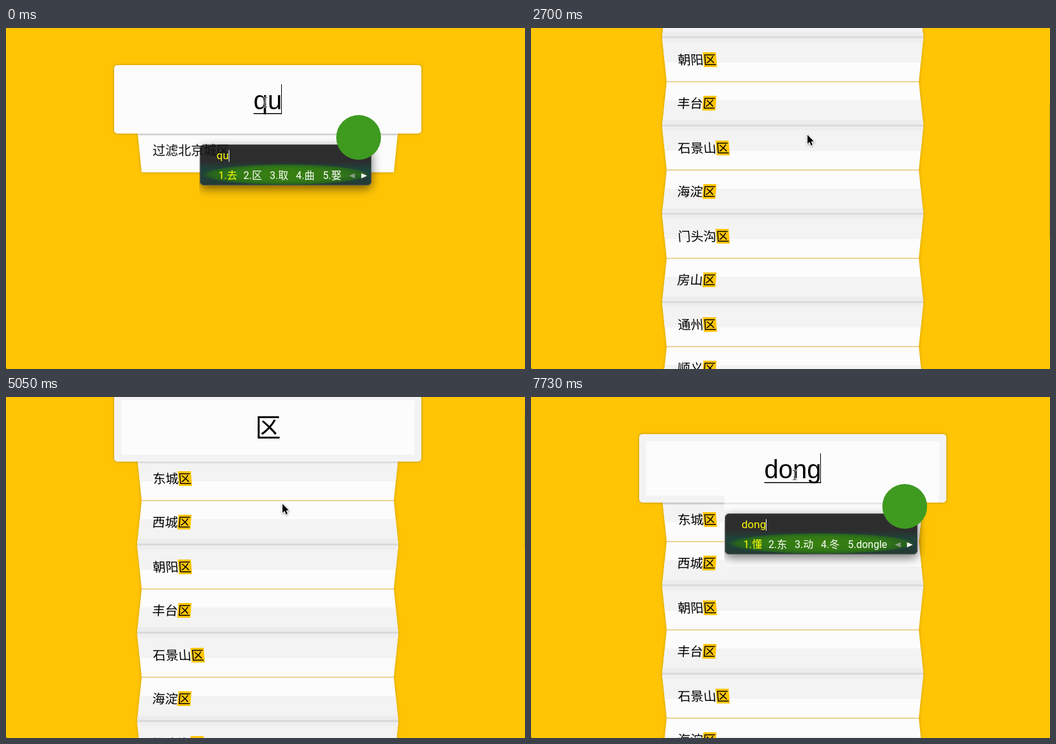
An HTML page with a canvas for the animation above (8000 ms loop, 811 by 533 pixels).

```html
<!DOCTYPE html>
<html lang="zh-CN">
<head>
<meta charset="utf-8">
<style>
html, body { margin: 0; width: 100%; height: 100%; overflow: hidden; background: #ffc505; }
canvas { display: block; }
</style>
</head>
<body>
<canvas id="stage" width="811" height="533"></canvas>
<script>
const c = document.getElementById('stage').getContext('2d');
const CJK = '"Noto Sans CJK SC", "Noto Sans CJK", sans-serif';
const YELLOW = '#ffc505', WHITE = '#fcfcfc', GRAY = '#f3f3f3';
const TOP = 157, PITCH = 69, STEP = 147.7, SCROLL_START = 1650;
const districts = '东城 西城 朝阳 丰台 石景山 海淀 门头沟 房山 通州 顺义 昌平 大兴 怀柔 平谷 密云 延庆'.split(' ');

// Key points as [step, value...]
const scrollKeys = [[0, 0], [1, 12], [3, 65], [6, 225], [7, 280], [9, 450], [12, 740], [14, 781],
  [15, 768], [18, 420], [21, 125], [23, 64], [26, 0]];
const mouseKeys = [[-1, 405, 116], [2, 432, 167], [25, 432, 167], [29, 412, 122]];

const typing = [
  { from: 0, to: 150, word: 'qu', list: ['去', '区', '取', '曲', '娶'] },
  { from: 7430, to: 7580, word: 'd', list: ['的', '大', '到', '都', '对'] },
  { from: 7580, to: 7730, word: 'do', list: ['都', '动', '东', '懂', 'double'] },
  { from: 7730, to: 8000, word: 'dong', list: ['懂', '东', '动', '冬', 'dongle'] }
];

function at(keys, k, col = 1) {
  const i = keys.findIndex(p => p[0] > k);
  if (i === 0) return keys[0][col];
  if (i < 0) return keys[keys.length - 1][col];
  const a = keys[i - 1], b = keys[i];
  return a[col] + (b[col] - a[col]) * (k - a[0]) / (b[0] - a[0]);
}

function rect(color, x, y, w, h) {
  c.fillStyle = color;
  c.fillRect(x, y, w, h);
}

function text(str, x, y, font, color = '#000', align = 'left') {
  c.font = font;
  c.fillStyle = color;
  c.textAlign = align;
  c.fillText(str, x, y);
}

function shadow(color, blur, dy = 0) {
  c.shadowColor = color;
  c.shadowBlur = blur;
  c.shadowOffsetY = dy;
}

function paperPath(count) {
  c.beginPath();
  for (let i = 0; i <= count; i++) c.lineTo(i % 2 ? 212 : 205, TOP + PITCH * i);
  for (let i = count; i >= 0; i--) c.lineTo(i % 2 ? 606 : 613, TOP + PITCH * i);
  c.closePath();
}

function paper(count) {
  c.save();
  paperPath(count);
  shadow('rgba(0,0,0,.2)', 5);
  c.fillStyle = WHITE;
  c.fill();
  c.restore();
}

function folds() {
  c.save();
  paperPath(districts.length);
  c.clip();
  districts.forEach((_, i) => {
    const y = TOP + PITCH * i, band = (color, from, to) => rect(color, 200, y + from, 420, to - from);
    if (i % 2) {
      band(GRAY, 29, 69);
      band('#ececec', 60, 69);
      band('#d9d9d9', 67, 69);
    } else {
      band(GRAY, 0, 39);
      band('#eeeeee', 0, 7);
      band('#dcdcdc', 0, 1);
      band('#e9d596', 68, 70);
    }
    if (i % 2 && i < districts.length - 1) band('#d9d9d9', 68, 69);
    if (i % 2) band('#e9d596', 0, 1);
  });
  c.restore();
}

function labels() {
  districts.forEach((name, i) => {
    const odd = i % 2, mid = TOP + PITCH * i + (odd ? 33.5 : 34.5);
    const x = odd ? 228.5 : 229.3, hx = x + 20 * name.length, slant = odd ? -.08 : .08;
    c.save();
    c.transform(1, 0, slant, 1, -slant * mid, 0);
    rect(YELLOW, hx, mid - 11.5, 20.5, 23);
    text(name + '区', x, mid + 7.3, '300 20px ' + CJK);
    c.restore();
  });
}

function searchBox(framed) {
  c.save();
  c.beginPath();
  c.roundRect(169, 58, 480, 107, 5);
  shadow('rgba(0,0,0,.3)', 4);
  c.fillStyle = framed ? GRAY : WHITE;
  c.fill();
  c.restore();
  if (framed) rect(WHITE, 180, 69, 458, 85);
}

function typed(word) {
  c.font = '40px "Liberation Sans", Arial, sans-serif';
  const w = c.measureText(word).width;
  text(word, 409, 127, c.font, '#000', 'center');
  rect('#000', 409 - w / 2, 133, w, 1.5);
  rect('#000', Math.round(409 + w / 2) - 1, 88, 1, 46);
}

function popup({ word, list }) {
  const font = '16px Roboto, ' + CJK;
  const xs = [332, 371, 412, 453, 495];
  c.font = font;
  const end = 495 + c.measureText('5.' + list[4]).width, right = Math.round(end + 47), w = right - 303;

  c.save();
  c.beginPath();
  c.rect(302, 165, 400, 110);
  c.clip();
  c.beginPath();
  c.roundRect(303, 182, w, 64, 7);
  shadow('rgba(0,0,0,.55)', 16, 5);
  c.fillStyle = '#2d2d2d';
  c.fill();
  shadow('transparent', 0);
  c.clip();
  const base = c.createLinearGradient(0, 208, 0, 246);
  base.addColorStop(0, '#2d2d2d');
  base.addColorStop(.35, '#1f433b');
  base.addColorStop(1, '#243b35');
  rect(base, 303, 208, w, 38);
  c.translate(303 + w / 2, 229);
  c.scale(w / 2, 17);
  const glow = c.createRadialGradient(0, 0, 0, 0, 0, 1);
  glow.addColorStop(0, '#39820f');
  glow.addColorStop(.65, '#327817');
  glow.addColorStop(.9, '#27601f');
  glow.addColorStop(1, 'rgba(31,67,59,0)');
  rect(glow, -1, -1, 2, 2);
  c.restore();

  c.strokeStyle = '#555';
  c.lineWidth = 1;
  c.beginPath();
  c.roundRect(303.5, 182.5, w - 1, 63, 6.5);
  c.stroke();

  if (word === 'qu') text('过滤北京城区', 229, 198.8, '300 20px ' + CJK, '#111');
  text(word, 329, 205, '17px Roboto, sans-serif', '#ff0');
  rect('#fff', 329 + Math.round(c.measureText(word).width), 191, 1, 18);
  list.forEach((s, i) => text(i + 1 + '.' + s, xs[i], 236, font, i ? '#fff' : '#ff0'));
  triangle(end + 12, end + 21, '#8a9a86', -1);
  triangle(end + 31, end + 40, '#fff', 1);

  c.fillStyle = '#3f9a20';
  c.beginPath();
  c.arc(right - 20, 171, 35, 0, 7);
  c.fill();
}

function triangle(l, r, color, dir) {
  const base = dir > 0 ? l : r, tip = dir > 0 ? r : l;
  c.fillStyle = color;
  c.beginPath();
  c.moveTo(base, 227);
  c.lineTo(tip, 231);
  c.lineTo(base, 235);
  c.fill();
}

function beam(x, y) {
  const p = new Path2D(`M${x - 3} ${y - 7.5}q3 0 3 2v11q0 2-3 2M${x + 3} ${y - 7.5}q-3 0-3 2M${x} ${y + 5.5}q0 2 3 2M${x - 2} ${y + 3}h4`);
  c.strokeStyle = 'rgba(255,255,255,.8)';
  c.lineWidth = 2.5;
  c.stroke(p);
  c.strokeStyle = '#222';
  c.lineWidth = 1;
  c.stroke(p);
}

function arrow(x, y) {
  const p = new Path2D(`M${x} ${y}v14l3.3-3 2.4 5.4 2.3-1-2.3-5.2h4.3z`);
  c.save();
  shadow('rgba(0,0,0,.4)', 3, 1);
  c.strokeStyle = '#fff';
  c.lineWidth = 2;
  c.stroke(p);
  c.restore();
  c.fillStyle = '#000';
  c.fill(p);
}

function draw(t) {
  const k = Math.floor((t - SCROLL_START) / STEP);
  const scroll = Math.round(at(scrollKeys, k));
  const input = typing.find(s => t >= s.from && t < s.to);
  const framed = t >= SCROLL_START, empty = t < 150;

  rect(YELLOW, 0, 0, 811, 533);
  c.save();
  c.translate(0, -scroll);
  paper(empty ? 1 : districts.length);
  if (empty) {
    rect('#e9d596', 212, 225, 394, 1);
  } else {
    folds();
    labels();
  }
  searchBox(framed);
  if (!framed && !empty) rect(GRAY, 202, 154, 414, 11);

  if (input) {
    if (framed) {
      // area repainted around the candidate window
      c.save();
      paperPath(districts.length);
      c.clip();
      rect(WHITE, 302, 165, 335, 100);
      c.restore();
      rect(WHITE, 302, 150, 335, 15);
    }
    rect('rgba(0,0,0,.08)', 207, 165, 404, 3);
    typed(input.word);
    popup(input);
  } else {
    if (t >= 6390) rect('#b4d6ff', 389, 87, 40, 47);
    text('区', 409.5, 126, '40px ' + CJK, '#000', 'center');
    const caret = t < 600 || (t >= 1200 && t < 1650) || (t >= 6090 && t < 6390);
    if (caret) rect('#000', 429, 87, 1, 47);
  }
  c.restore();

  if (framed && t < 6690) rect('rgba(0,0,0,.12)', 810, 2 + scroll * .408, 1, 210);
  const mx = at(mouseKeys, k), my = at(mouseKeys, k, 2);
  (my < 165 - scroll ? beam : arrow)(mx, my);
  rect('#443a18', 0, 532, 1, 1);
}

const start = performance.now();
function tick() {
  draw((performance.now() - start) % 8000);
  requestAnimationFrame(tick);
}
tick();
</script>
</body>
</html>
```
